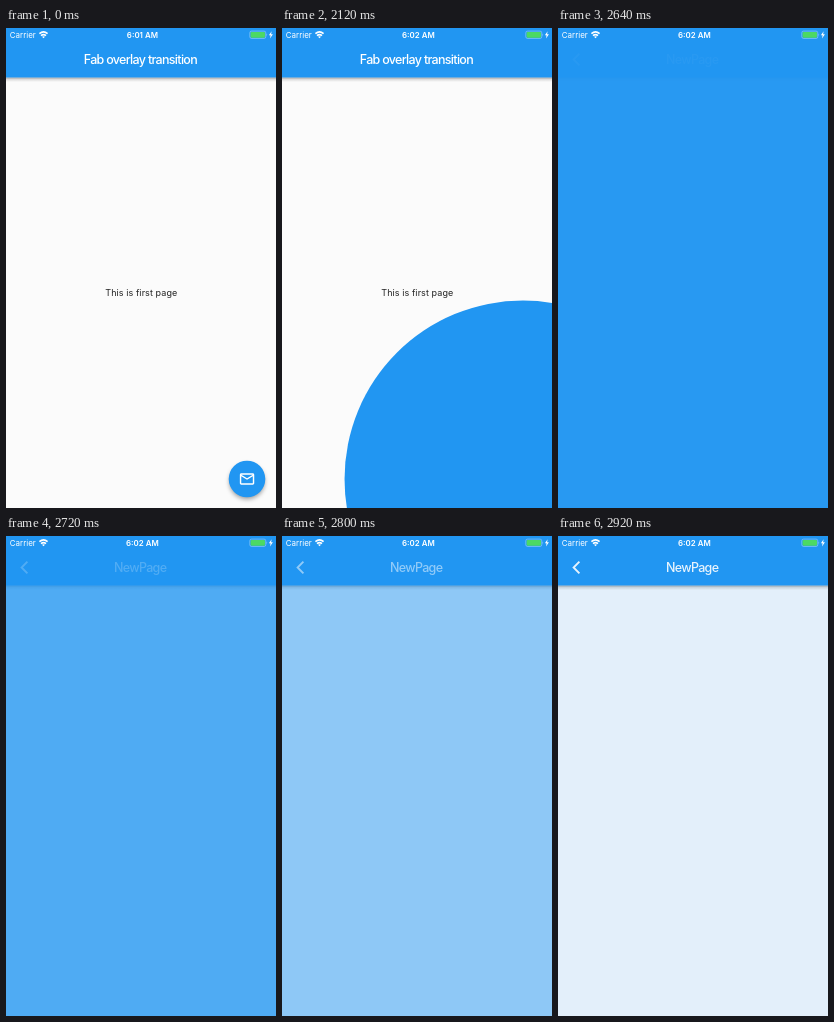
Animation of 270 by 480 pixels, one loop 5400 ms. Source, as an HTML page:

```html
<!DOCTYPE html>
<html lang="en">
<head>
<meta charset="utf-8">
<title>Fab overlay transition</title>
<style>
  html, body { margin: 0; width: 100%; height: 100%; overflow: hidden; background: #fbfbfb; }
  svg { display: block; width: 100vw; height: 100vh; font-family: Inter, Roboto, sans-serif; }
  .blue { fill: #2196f2; }
  .page { fill: #fbfbfb; }
  .title { font-size: 12.5px; font-weight: 500; letter-spacing: -.69px; fill: #fff; text-anchor: middle; }
  .label { font-size: 9px; letter-spacing: .08px; fill: #222; text-anchor: middle; }
  .status { font-size: 8px; fill: #fff; }
  .clock { font-size: 7.9px; font-weight: 600; text-anchor: middle; }
  .line { fill: none; stroke: #fff; }
</style>
</head>
<body>
<svg viewBox="0 0 270 480">
  <defs>
    <linearGradient id="shade" x2="0" y2="1">
      <stop offset="0" stop-opacity=".36"/>
      <stop offset=".45" stop-opacity=".12"/>
      <stop offset="1" stop-opacity="0"/>
    </linearGradient>
    <filter id="soft" x="-50%" y="-50%" width="200%" height="200%">
      <feGaussianBlur stdDeviation="2.3"/>
    </filter>
    <g id="bar">
      <rect y="49.4" width="270" height="4.6" fill="url(#shade)"/>
      <rect class="blue" width="270" height="49.5"/>
    </g>
  </defs>

  <g id="first">
    <rect class="page" width="270" height="480"/>
    <use href="#bar"/>
    <text class="title" x="134.4" y="36">Fab overlay transition</text>
    <text class="label" x="135.3" y="268">This is first page</text>
    <circle cx="241" cy="453.6" r="17.8" fill-opacity=".36" filter="url(#soft)"/>
    <circle class="blue" cx="241" cy="451" r="18.3"/>
    <circle id="press" cx="241" cy="451" r="18.3" fill="#fff" opacity="0"/>
    <path transform="translate(232.4 442.4) scale(.72)" fill="#fff"
      d="M22 6c0-1.1-.9-2-2-2H4c-1.1 0-2 .9-2 2v12c0 1.1.9 2 2 2h16c1.1 0 2-.9 2-2V6zm-2 0l-8 5-8-5h16zm0 12H4V8l8 5 8-5v10z"/>
  </g>

  <circle id="ripple" class="blue" cx="241" cy="451" r="0"/>

  <g id="second" opacity="0">
    <rect class="page" width="270" height="480"/>
    <use href="#bar"/>
    <path class="line" stroke-width="1.9" d="M21.4 25.6 15.6 31.5 21.4 37.4"/>
    <text class="title" x="134.2" y="36">NewPage</text>
  </g>

  <g class="status">
    <text x="3.7" y="9.8">Carrier</text>
    <path class="line" stroke-width="1.6" d="M33.4 5.7Q37.5 2.2 41.6 5.7M35 7.6Q37.5 5.5 40 7.6"/>
    <path d="M36 8.8Q37.5 7.7 39 8.8L37.5 10.3Z"/>
    <text id="clock" class="clock" x="136.4" y="9.8">6:01 AM</text>
    <rect class="line" x="243.8" y="3.1" width="16" height="7.4" rx="1.8" stroke-width=".6" opacity=".55"/>
    <rect x="244.6" y="3.9" width="14.4" height="5.8" rx="1.1" fill="#4cd964"/>
    <path d="M260.6 5.5q1.2 1.3 0 2.6z" opacity=".6"/>
    <path d="M265.6 3.2 262.9 7.2H264.6L264 10.4 266.9 6.2H265.1Z"/>
  </g>
</svg>
<script>
  const LOOP = 5400, STEP = 40;
  const CLOCK_AT = 1960, PRESS_AT = 2000, RIPPLE_AT = 2040;
  const FADE_AT = 2640;
  const FADE = [.03, .11, .21, .36, .5, .63, .76, .89];
  const RADIUS = 18.3, SPEED = 624 / 300;

  const get = id => document.getElementById(id);
  const [clock, press, ripple, second] = ['clock', 'press', 'ripple', 'second'].map(get);

  function rippleRadius(t) {
    if (t < RIPPLE_AT) return 0;
    return RADIUS + SPEED * Math.min(300, Math.max(0, t - RIPPLE_AT - 3));
  }

  function fade(t) {
    if (t < FADE_AT) return 0;
    return FADE[Math.min(FADE.length - 1, (t - FADE_AT) / STEP)];
  }

  function draw(time) {
    const t = Math.floor(time % LOOP / STEP) * STEP;
    clock.textContent = t < CLOCK_AT ? '6:01 AM' : '6:02 AM';
    press.setAttribute('opacity', t === PRESS_AT ? .1 : 0);
    ripple.setAttribute('r', rippleRadius(t));
    second.setAttribute('opacity', fade(t));
  }

  const start = performance.now();
  function tick() {
    draw(performance.now() - start);
    requestAnimationFrame(tick);
  }
  tick();
</script>
</body>
</html>
```
